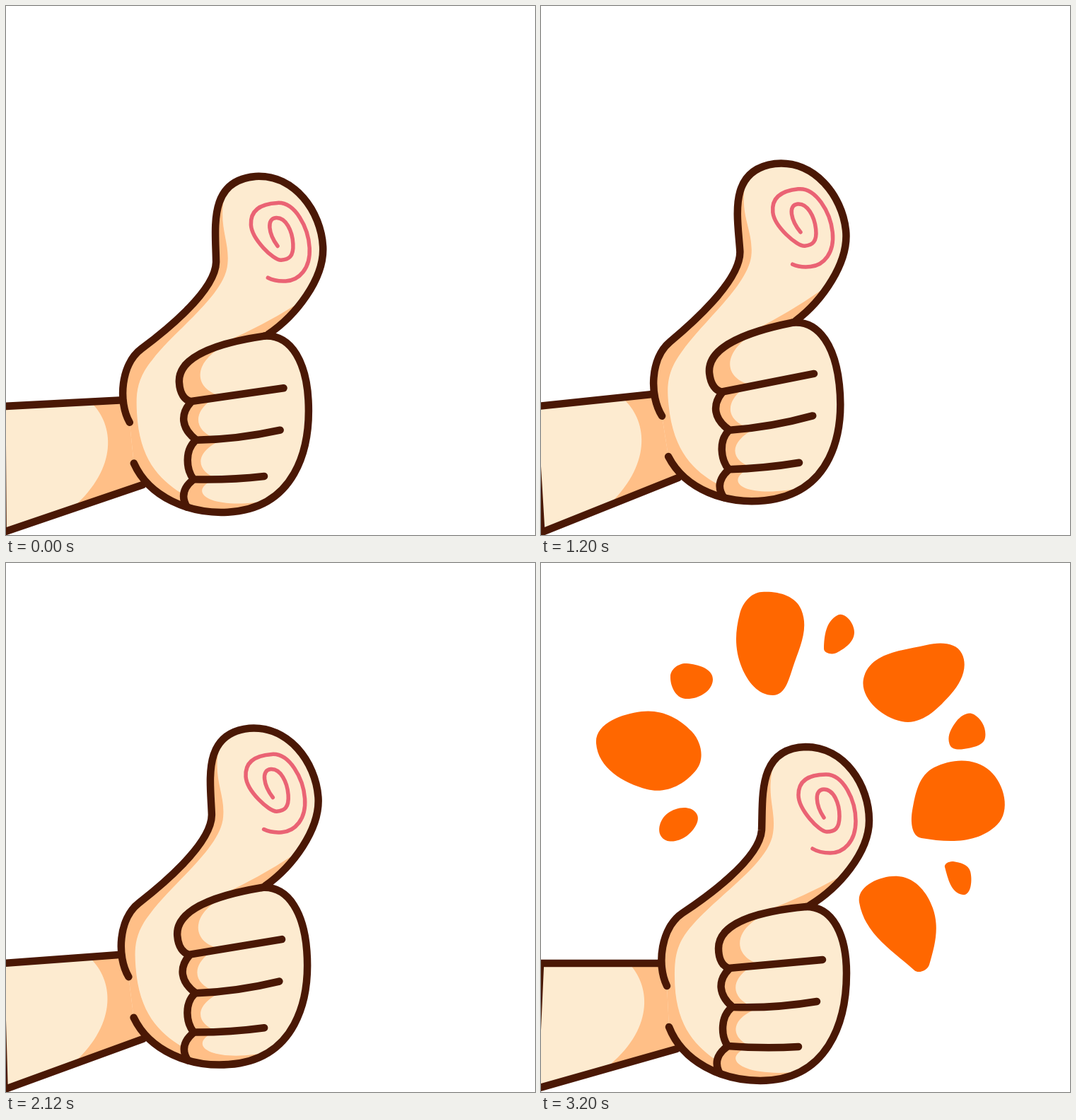
Animation of 748 by 748 pixels, one loop 3.24 s. Source, as an HTML page:

```html
<!DOCTYPE html>
<html lang="en">
<head>
<meta charset="utf-8">
<title>Thumbs up</title>
<style>
  html, body { margin: 0; width: 100%; height: 100%; overflow: hidden; background: #fff; }
  svg { display: block; width: 100%; height: 100%; }
  .line { fill: none; stroke: #4a1805; stroke-width: 10.5; stroke-linecap: round; stroke-linejoin: round; }
  .skin { fill: #fdebd0; }
  .shade { fill: #ffbf87; }
  .swirl { fill: none; stroke: #ea6374; stroke-width: 5.5; stroke-linecap: round; }
  .spark { fill: #ff6700; }
</style>
</head>
<body>
<svg viewBox="0 0 748 748">
  <clipPath id="inside"></clipPath>
  <g id="burst"></g>
  <g id="hand"></g>
</svg>
<script>
const FRAME = 40, FRAMES = 81;
const SWING = 10;          // frames per swing
const BLINK = 12;          // frames per burst state
const [clip, burst, hand] = ['inside', 'burst', 'hand'].map(id => document.getElementById(id));

function add(parent, cls, d) {
  const p = document.createElementNS('http://www.w3.org/2000/svg', 'path');
  p.setAttribute('class', cls);
  p.setAttribute('d', d);
  parent.append(p);
  return p;
}

// Closed smooth shape: each handle runs parallel to the chord of its neighbours.
function blob(corners) {
  const pts = corners.split(' ').map(p => p.split(',').map(Number));
  const n = pts.length, at = i => pts[(i + n) % n];
  const handle = (i, len) => {
    const [a, b, c] = [at(i - 1), at(i), at(i + 1)];
    const k = len / Math.hypot(c[0] - a[0], c[1] - a[1]);
    return [b[0] + (c[0] - a[0]) * k, b[1] + (c[1] - a[1]) * k];
  };
  return 'M' + pts[0] + pts.map((p, i) => {
    const q = at(i + 1);
    const len = 0.36 * Math.hypot(q[0] - p[0], q[1] - p[1]);
    return `C${handle(i, len)} ${handle(i + 1, -len)} ${q}`;
  }).join('');
}

// The hand is drawn at rest, with the forearm level.
const arm = 'M170,566 H-1 L-9,744 L192,687';
const thumb = 'M178,598 C163,568 170,515 200,495 C230,475 309,420 312,378 ' +
  'C314,330 306,262 374,260 C430,260 464,315 464,364 C464,410 420,460 380,484';
const fist = '375,486 C415,486 432,530 432,580 C432,650 405,732 310,732 C255,732 200,705 181,656';
const body = `${thumb} L${fist} Z`;

// Each finger: its knuckle, the crease below it, and the edge of the light.
const fingers = [
  ['M375,486 C310,492 251,508 251,545 C251,562 258,570 265,573', 'L398,561',
    'L315,569 C270,560 265,515 330,491'],
  ['M266,574 C250,590 250,610 271,628', 'Q330,630 390,620', 'L300,628 C268,615 268,590 294,573'],
  ['M269,629 C254,642 254,668 264,683', 'Q315,687 364,684', 'L298,684 C268,672 265,645 308,629'],
  ['M263,684 C248,695 245,708 253,722', '', 'L300,733 L375,718 C290,730 250,702 292,685']
];

const sideShade = 'M328,288 C318,330 333,350 328,382 C322,425 250,470 215,511 ' +
  'C190,538 189,560 189,585 C189,650 215,680 246,702 V740 H100 V280 Z';
const thumbShade = 'M318,492 Q375,470 418,446 L440,470 L380,488 Z';
const wristShade = 'M126,568 C155,600 160,660 92,714 L192,687 V566 Z';

add(hand, 'skin', arm);
add(hand, 'shade', wristShade);
add(hand, 'skin', body);
add(clip, '', body);
for (const d of [sideShade, thumbShade, ...fingers.map(([knuckle, , light]) => knuckle + light)])
  add(hand, 'shade', d).setAttribute('clip-path', 'url(#inside)');
for (const d of [arm, thumb, 'M' + fist, ...fingers.map(([knuckle, crease]) => knuckle + crease)])
  add(hand, 'line', d);
add(hand, 'swirl', 'M400,360 C388,342 386,320 400,320 S422,340 422,358 S415,380 404,380 ' +
  'S364,348 364,328 S378,299 403,299 S445,336 445,365 S428,410 409,410 Q394,410 384,404');

[
  '78,255 142,210 213,238 220,292 150,320',
  '281,72 312,41 368,66 356,148 328,187 284,148',
  '400,121 419,74 443,98 418,127',
  '457,160 545,116 595,128 580,185 510,224',
  '578,257 588,223 612,214 628,247 604,262',
  '525,350 556,289 635,294 645,370 538,389',
  '571,430 583,422 607,436 596,469',
  '450,480 505,443 554,488 549,568 528,576',
  '171,388 179,354 219,353 206,386',
  '183,160 206,142 243,165 204,192'
].forEach(corners => add(burst, 'spark', blob(corners)));

// Lift of the hand: starts halfway, then swings between 1 and 0.
function lift(f) {
  if (f < SWING) return 0.5 + 0.5 * f / SWING;
  const k = (f / SWING) % 2;
  return k < 1 ? k : 2 - k;
}

function draw(ms) {
  const f = Math.floor((ms + 0.01) / FRAME) % FRAMES;
  hand.setAttribute('transform', `rotate(${-6 * lift(f)} 0 655)`);
  const lit = Math.floor((f + 4) / BLINK) % 2 === 1;
  burst.setAttribute('visibility', lit ? 'visible' : 'hidden');
}

const start = performance.now();
function tick() {
  draw(performance.now() - start);
  requestAnimationFrame(tick);
}
tick();
</script>
</body>
</html>
```
